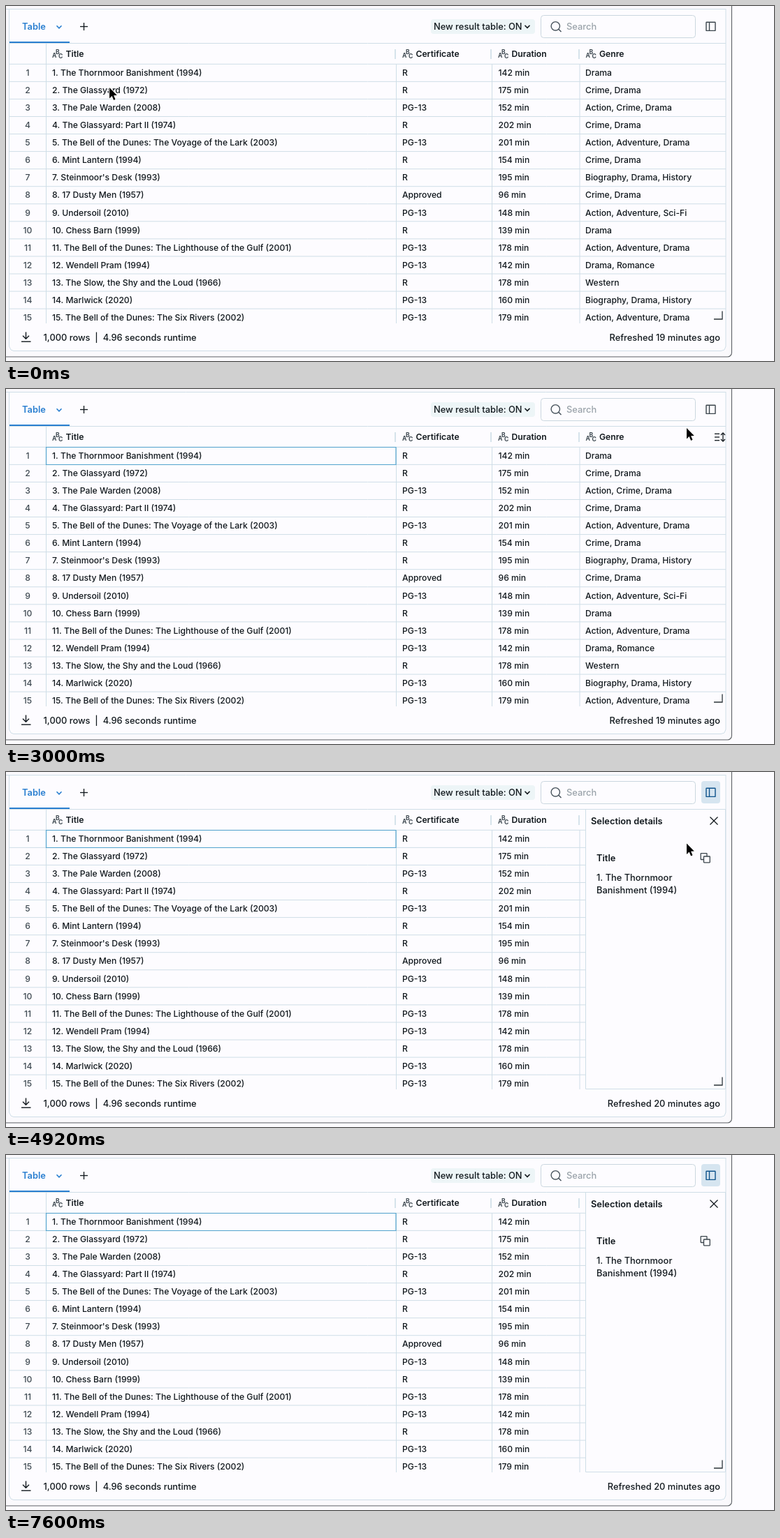
Animation, 1099 px wide and 509 px high, one loop 7680 ms. Source, as an HTML page with a canvas:

```html
<!DOCTYPE html>
<html lang="en">
<head>
<meta charset="utf-8">
<title>Result table</title>
<style>
html, body { margin: 0; width: 100%; height: 100%; overflow: hidden; background: #fdfcff; }
canvas { display: block; width: 1099px; height: 509px; }
</style>
</head>
<body>
<canvas id="stage"></canvas>
<script>
const W = 1099, H = 509, LOOP = 7680;
const canvas = document.getElementById('stage');
const ctx = canvas.getContext('2d');
const ratio = window.devicePixelRatio || 1;
canvas.width = W * ratio;
canvas.height = H * ratio;

const BG = '#fdfcff', INK = '#11181d', LINE = '#cfdee7', BLUE = '#2a7fd0', DEEP = '#0e538b';
const HOVER = '#e4eff6', ACTIVE = '#d6e5f0';
const TOP = 83.3, ROW = 25.06, BOTTOM = 455;
const SMALL = 12.15, BASE = 12.85;

const columns = [
  { name: 'Title', x: 57.5, end: 558 },
  { name: 'Certificate', x: 558.5, end: 695 },
  { name: 'Duration', x: 695.5, end: 821 },
  { name: 'Genre', x: 821, end: 1037 }
];

const saga = 'The Bell of the Dunes: ';
const rows = [
  ['The Thornmoor Banishment (1994)', 'R', 142, 'Drama'],
  ['The Glassyard (1972)', 'R', 175, 'Crime, Drama'],
  ['The Pale Warden (2008)', 'PG-13', 152, 'Action, Crime, Drama'],
  ['The Glassyard: Part II (1974)', 'R', 202, 'Crime, Drama'],
  [saga + 'The Voyage of the Lark (2003)', 'PG-13', 201, 'Action, Adventure, Drama'],
  ['Mint Lantern (1994)', 'R', 154, 'Crime, Drama'],
  ["Steinmoor's Desk (1993)", 'R', 195, 'Biography, Drama, History'],
  ['17 Dusty Men (1957)', 'Approved', 96, 'Crime, Drama'],
  ['Undersoil (2010)', 'PG-13', 148, 'Action, Adventure, Sci-Fi'],
  ['Chess Barn (1999)', 'R', 139, 'Drama'],
  [saga + 'The Lighthouse of the Gulf (2001)', 'PG-13', 178, 'Action, Adventure, Drama'],
  ['Wendell Pram (1994)', 'PG-13', 142, 'Drama, Romance'],
  ['The Slow, the Shy and the Loud (1966)', 'R', 178, 'Western'],
  ['Marlwick (2020)', 'PG-13', 160, 'Biography, Drama, History'],
  [saga + 'The Six Rivers (2002)', 'PG-13', 179, 'Action, Adventure, Drama']
];

// Pointer keys: time, x, y
const path = [
  [0, 148, 117], [40, 148, 117], [160, 148, 106], [360, 148, 106], [440, 148, 104.5],
  [1160, 148, 104.5], [1480, 148.5, 95], [2440, 148.5, 95], [3000, 974, 56],
  [3320, 1005, 30], [4760, 1005, 30], [4920, 974, 102.5], [5220, 1002, 127.5], [LOOP, 1002, 127.5]
];
const SELECT = 1840, OPEN = 3680, TICK = 3520, TIP = 5360, PRESS = 6200, LEAVE = 6800;

const clamp = v => Math.max(0, Math.min(1, v));
const ease = v => v * v * (3 - 2 * v);
const inside = (p, x, y, w, h) => p.x >= x && p.x <= x + w && p.y >= y && p.y <= y + h;

function pointer(t) {
  let i = 0;
  while (i < path.length - 2 && t >= path[i + 1][0]) i++;
  const [a, ax, ay] = path[i], [b, bx, by] = path[i + 1];
  const k = ease(clamp((t - a) / (b - a)));
  return { x: ax + (bx - ax) * k, y: ay + (by - ay) * k };
}

function text(str, x, mid, { size = BASE, weight = 450, color = INK, align = 'left' } = {}) {
  ctx.font = `${weight} ${size}px Inter, "Liberation Sans", sans-serif`;
  ctx.textAlign = align;
  ctx.fillStyle = color;
  ctx.fillText(str, x, mid + size * 0.36);
}

function box(x, y, w, h, r, fill, stroke, width = 1) {
  ctx.beginPath();
  ctx.roundRect(x, y, w, h, r);
  if (fill) { ctx.fillStyle = fill; ctx.fill(); }
  if (stroke) { ctx.strokeStyle = stroke; ctx.lineWidth = width; ctx.stroke(); }
}

function line(color, width, ...pts) {
  ctx.strokeStyle = color;
  ctx.lineWidth = width;
  ctx.beginPath();
  for (let i = 0; i < pts.length; i += 2) ctx.lineTo(pts[i], pts[i + 1]);
  ctx.stroke();
}

function chevron(x, y, color) {
  line(color, 1.6, x - 3.5, y - 1.8, x, y + 1.8, x + 3.5, y - 1.8);
}

function drawFrame() {
  ctx.fillStyle = BG;
  ctx.fillRect(0, 0, W, H);
  box(-20, -20, 1058.5, 523, 6, '#faf9fc', '#5d6165', 1.1);
  ctx.fillStyle = BG;
  ctx.fillRect(4.5, 4.5, 1025.5, 490);
  line(LINE, 1, 0, 4.5, 1030, 4.5);
  line(LINE, 1, 4.5, 4, 4.5, 488, 7, 493, 11, 494.5, 1023, 494.5, 1028, 493, 1030, 488, 1030, 4);
}

function drawToolbar(hover, open) {
  text('Table', 23, 29.5, { weight: 600, color: BLUE });
  chevron(76, 30, BLUE);
  line(INK, 1.3, 106, 29.5, 117, 29.5);
  line(INK, 1.3, 111.5, 24, 111.5, 35);
  line(LINE, 1, 5, 53.5, 1030, 53.5);
  line(BLUE, 2, 5, 52, 91, 52);

  box(608, 19, 149, 21, 4, '#edf5f7');
  text('New result table: ON', 612, 29.5);
  chevron(746, 29.5, INK);

  box(765.5, 13.5, 221, 32, 4, null, '#cbd7df');
  ctx.strokeStyle = '#46525b';
  ctx.lineWidth = 1.4;
  ctx.beginPath();
  ctx.arc(786.3, 28.8, 6.2, 0, 7);
  ctx.stroke();
  line('#46525b', 1.5, 790.8, 33.3, 794.5, 37);
  text('Search', 802, 29.5, { color: '#9aa3aa' });

  if (hover || open) box(995, 13, 27, 32, 4, hover ? HOVER : ACTIVE);
  const tone = hover || open ? DEEP : '#3b454c';
  box(1002, 23.2, 13, 12.2, 0.5, null, tone, 1.4);
  line(tone, 1.4, 1006.5, 23, 1006.5, 35.5);
}

function drawTypeIcon(x) {
  const style = { size: 8.6, weight: 700, color: '#3f4a52' };
  text('A', x, 71, style);
  text('B', x + 5, 65.8, style);
  text('C', x + 9, 72.2, style);
}

function drawSortIcon(x) {
  for (const y of [64.3, 69, 73.7]) line(INK, 1.3, x - 8, y, x - 1, y);
  line(INK, 1.3, x + 4, 63.5, x + 4, 74.5);
  line(INK, 1.3, x + 1, 66, x + 4, 63, x + 7, 66);
  line(INK, 1.3, x + 1, 72, x + 4, 75, x + 7, 72);
}

function drawTable(p, selected, open) {
  ctx.save();
  ctx.beginPath();
  ctx.rect(5, 54, 1025, BOTTOM - 54);
  ctx.clip();
  columns.forEach((c, i) => {
    drawTypeIcon(c.x + 8.5);
    text(c.name, c.x + 28, 69, { size: SMALL, weight: 600 });
    if (i < 3) line('#c9dbe5', 1.5, c.end - 1, 62, c.end - 1, 76);
    line(LINE, 1, c.x, i ? TOP : 54, c.x, BOTTOM);
    if (inside(p, c.x, 54, c.end - c.x, 29)) drawSortIcon(c.end - 15);
  });
  rows.forEach(([title, rating, mins, genre], i) => {
    const y = TOP + ROW * i, mid = y + 12.4;
    line(LINE, 1, 5, y, 1030, y);
    const cell = { size: SMALL };
    text(i + 1, 31, mid, { size: SMALL, align: 'center', color: '#3f4a52' });
    text(`${i + 1}. ${title}`, 66, mid - (selected && !i ? 0.5 : 0), cell);
    text(rating, 567, mid, cell);
    text(`${mins} min`, 704.5, mid, cell);
    text(genre, 829, mid, cell);
  });
  if (selected) box(57.5, 83.5, 500.5, 25, 0, null, '#55a5cf', 1.2);
  ctx.restore();
  if (open) drawPanel(p);
  line('#2b3339', 1.3, 1013, 449, 1025, 449, 1025, 437.5);
}

function drawPanel(p) {
  ctx.fillStyle = BG;
  ctx.fillRect(829, 54, 201, 401);
  line(LINE, 1, 829.5, 54, 829.5, 454.5, 1029.5, 454.5, 1029.5, 54);
  text('Selection details', 837, 70, { weight: 600 });
  line(INK, 1.3, 1007.5, 64.5, 1018.5, 75.5);
  line(INK, 1.3, 1018.5, 64.5, 1007.5, 75.5);
  text('Title', 845, 123.5, { weight: 600 });
  const words = rows[0][0].split(' ');
  text('1. ' + words.slice(0, 2).join(' '), 845, 151.5);
  text(words.slice(2).join(' '), 845, 169.5);

  const hover = inside(p, 989, 112, 23, 23);
  if (hover) box(989, 112, 24, 24, 4, HOVER);
  const tone = hover ? DEEP : '#3b454c';
  box(994.2, 116.7, 8.8, 8.8, 0.5, null, tone, 1.3);
  box(998.5, 121, 8.8, 8.8, 0.5, hover ? HOVER : BG, tone, 1.3);
}

function drawFooter(minutes) {
  line(INK, 1.4, 28.5, 467.5, 28.5, 477);
  line(INK, 1.4, 24, 472.8, 28.5, 477.3, 33, 472.8);
  line(INK, 1.4, 22, 481.2, 35.5, 481.2);
  text('1,000 rows  |  4.96 seconds runtime', 53.5, 475);
  text(`Refreshed ${minutes} minutes ago`, 1022, 475, { align: 'right' });
}

function drawTooltip(alpha) {
  ctx.save();
  ctx.globalAlpha = alpha;
  ctx.shadowColor = 'rgba(0,0,0,.18)';
  ctx.shadowBlur = 6;
  ctx.shadowOffsetY = 2;
  box(939, 69.5, 123, 31.5, 4, '#1f272d');
  ctx.shadowColor = 'transparent';
  ctx.beginPath();
  ctx.moveTo(995.5, 100.5);
  ctx.lineTo(1000.5, 105);
  ctx.lineTo(1005.5, 100.5);
  ctx.fill();
  text('Copy to clipboard', 946.5, 85, { color: '#f4f6f8' });
  ctx.restore();
}

const arrow = new Path2D('M0 0V15.4L3.6 12.1 6.2 17.9 8.5 16.8 6.1 11.2 10.8 10.9Z');
const hand = new Path2D('M-1.8 1.5C-1.8-.5 1.2-.5 1.3 1.5L1.7 6.2C2.2 4.9 4.3 5.2 4.4 6.8 5 5.8 6.9 6.2 7 7.7 7.8 7 9.2 7.6 9.1 9.3L8.8 12.3C8.6 14 7.3 14.6 7.2 17.6H-1.8C-2 15.2-3.6 14-5 11.6-5.8 10.2-7.4 9-6.5 8-5.4 7-3.7 8.4-2.6 10Z');

function drawPointer(p, pointing, alpha, scale) {
  ctx.save();
  ctx.globalAlpha = alpha;
  ctx.translate(p.x, p.y);
  ctx.scale(scale, scale);
  ctx.lineJoin = 'round';
  ctx.strokeStyle = pointing ? '#000' : '#fff';
  ctx.lineWidth = pointing ? 2.4 : 1.8;
  ctx.stroke(pointing ? hand : arrow);
  ctx.fillStyle = pointing ? '#fff' : '#000';
  ctx.fill(pointing ? hand : arrow);
  if (pointing) {
    for (const x of [1.2, 3.6, 6]) line('#000', 1, x, 10.5, x + 0.1, 14.8);
  }
  ctx.restore();
}

function render(t) {
  const p = pointer(t);
  const open = t >= OPEN, gone = clamp((t - LEAVE) / 200);
  const onToggle = inside(p, 995, 13, 27, 32);
  const live = gone < 1 ? p : { x: -1, y: -1 };
  const onCopy = open && inside(live, 989, 112, 23, 23);
  ctx.setTransform(ratio, 0, 0, ratio, 0, 0);
  drawFrame();
  drawToolbar(onToggle, open);
  drawTable(live, t >= SELECT, open);
  drawFooter(t < TICK ? 19 : 20);
  const tip = Math.min(clamp((t - TIP) / 80), 1 - gone);
  if (tip > 0) drawTooltip(tip);
  const press = 1 - 0.12 * Math.max(0, 1 - Math.abs(t - PRESS) / 120);
  if (gone < 1) drawPointer(p, onToggle || onCopy, 1 - gone, press);
}

function tick() {
  render(performance.now() % LOOP);
  requestAnimationFrame(tick);
}
tick();
</script>
</body>
</html>
```
